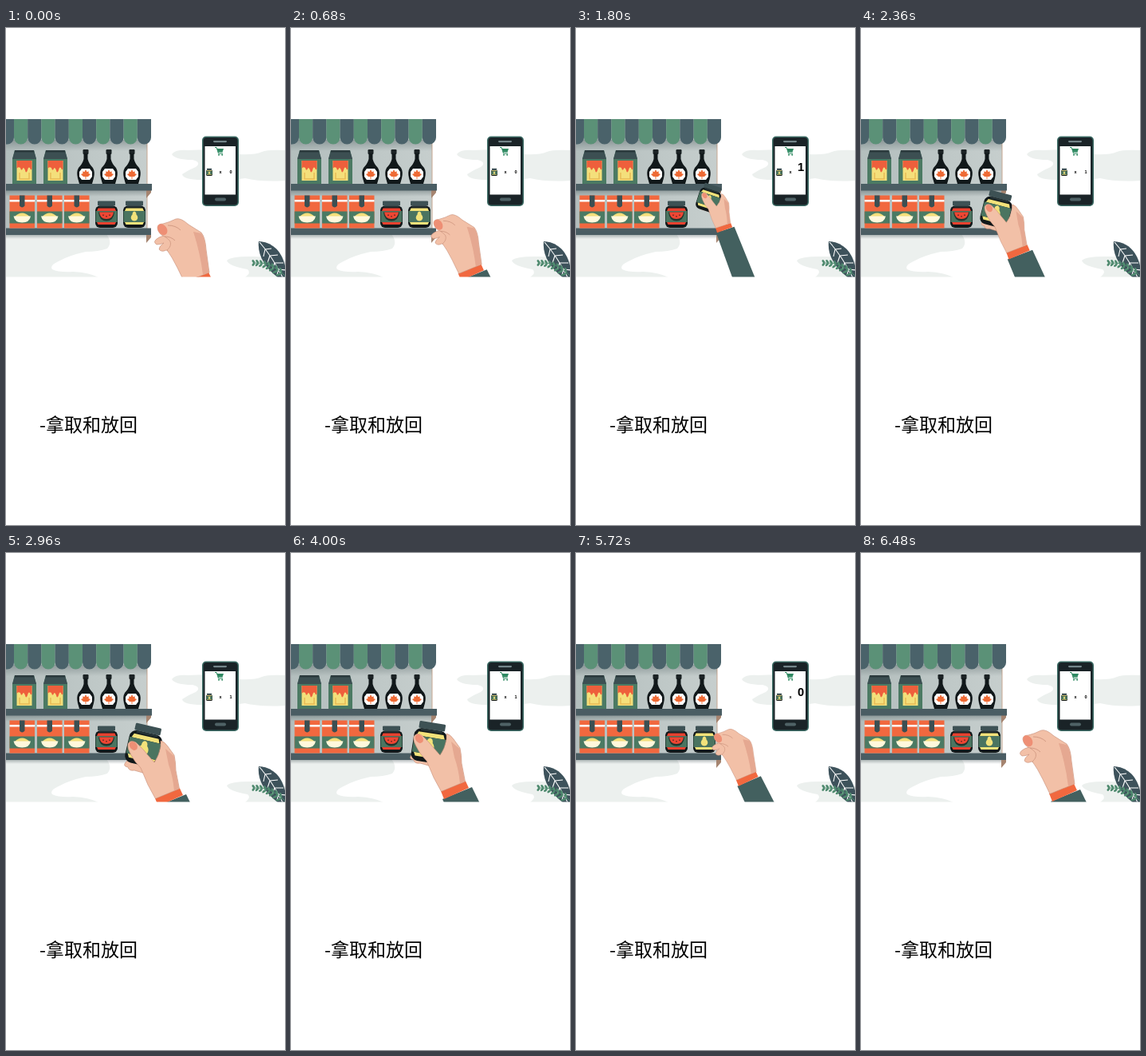
Animation of 350 by 622 pixels, one loop 6520 ms. Source, as an HTML page:

```html
<!DOCTYPE html>
<html lang="zh">
<head>
<meta charset="utf-8">
<title>拿取和放回</title>
<style>
html, body { margin: 0; width: 100%; height: 100%; overflow: hidden; background: #fff; }
svg { display: block; width: 100%; height: 100%; }
.title { font: 23px "Noto Sans CJK SC", "Noto Sans CJK", "Noto Sans CJK JP", sans-serif; }
.count { font: bold 5.5px "Liberation Sans", Arial, sans-serif; text-anchor: middle; }
.skin { fill: #f2c0a7; stroke: #c48a74; stroke-width: .6; stroke-linejoin: round; }
.shade { fill: #e5a891; }
.nail { fill: #ee8f75; }
</style>
</head>
<body>
<svg viewBox="0 0 350 622">
  <defs>
    <clipPath id="stage"><rect y="114" width="350" height="197.5"/></clipPath>
    <linearGradient id="wall" x2="1" y2="0">
      <stop offset="0" stop-color="#b3bebd"/><stop offset="1" stop-color="#c6cecd"/>
    </linearGradient>
    <linearGradient id="shadow" x2="0" y2="1">
      <stop offset="0" stop-color="#3a4a4d" stop-opacity=".35"/><stop offset="1" stop-color="#3a4a4d" stop-opacity="0"/>
    </linearGradient>

    <g id="carton">
      <path d="M3 0H27L30 11V42H0V11Z" fill="#4b7a63"/>
      <path d="M3 0H27L30 11H0Z" fill="#3c4f52"/>
      <path d="M3 0H27V2.5H3Z" fill="#2b3a3d"/>
      <rect x="5.5" y="13" width="19" height="25" fill="#f4df7b"/>
      <path d="M5.5 13H24.5V23Q23 26 22 22Q20 20 19 25Q17 30 16 25Q14 20 13 23Q11 27 10 22Q7 20 5.5 23Z" fill="#ee5f3c"/>
      <path d="M9 28V36H21V28" fill="none" stroke="#e9bb55" stroke-width="1.5"/>
    </g>
    <g id="bottle">
      <rect x="8.5" width="7" height="6" rx="1.2" fill="#1b2224"/>
      <path d="M9.500 5H14.500V12Q16 18 21 23Q24 28 22 36L20 43H4L2 36Q0 28 3 23Q8 18 9.500 12Z" fill="#11181a"/>
      <path d="M7 24H17L20 28V34L17 38H7L4 34V28Z" fill="#fff"/>
      <path d="M12 25L13.500 28L16 27.500L15.500 30L18 31L15 34H12.500V37H11.500V34H9L6 31L8.500 30L8 27.500L10.500 28Z" fill="#ee6a35"/>
    </g>
    <g id="box">
      <rect width="31.500" height="41" fill="#f1683f"/>
      <rect y="5.500" width="31.500" height="2.500" fill="#fff"/>
      <path d="M12.500 0H19V13Q15.700 17 12.500 13Z" fill="#3c4f52"/>
      <rect y="20" width="31.500" height="15" fill="#4b7a63"/>
      <path d="M6 27Q15.700 17 25.500 27Z" fill="#f4df7b"/>
      <path d="M5 26H26.500Q25 34 15.700 34T5 26Z" fill="#fff8dc"/>
    </g>
    <g id="jar">
      <rect x="-14" y="-11" width="28" height="27.500" rx="6" fill="#11181a"/>
      <rect x="-11" y="-17" width="22" height="6" rx="1" fill="#3d5154"/>
      <rect x="-9" y="-11" width="18" height="2" fill="#243235"/>
      <path d="M-10.500 -8H10.500L12 -4.500H-12ZM-12 9.500H12L10.500 12.500H-10.500Z" fill="currentColor"/>
      <rect x="-13.500" y="-4.500" width="27" height="14" fill="#4a7460"/>
    </g>
    <g id="pearJar" color="#f2e27a">
      <use href="#jar"/>
      <path d="M0 -4Q2.500 -3.500 2.500 0Q5 2.500 4 5.500Q2.500 8 0 8T-4 5.500Q-5 2.500 -2.500 0Q-2.500 -3.500 0 -4Z" fill="#f2e27a"/>
    </g>
    <g id="melonJar" color="#e8412f">
      <use href="#jar"/>
      <path d="M-10 -3H10Q9 8 0 8T-10 -3Z" fill="#20342c"/>
      <path d="M-9 -3H9Q8 5.500 0 5.500T-9 -3Z" fill="#ee4633"/>
      <path d="M-4 0v1.500M0 1.500v1.500M4 0v1.500" stroke="#11181a"/>
    </g>
    <g id="arm">
      <path d="M30 75L67 60L148 225L103 240Z" fill="#43605f"/>
      <path d="M28 65L59 52.500L63 61L32 75Z" fill="#f1683f"/>
    </g>
  </defs>

  <g clip-path="url(#stage)">
    <g fill="#ecf0ee">
      <path d="M0 258H126Q134 268 127 276Q116 280 100 280Q78 285 68 291Q54 297 58 302Q66 306 84 305Q104 306 116 312H0Z"/>
      <path d="M208 158Q212 152 228 153Q280 150 292 158Q312 159 321 155Q328 152 350 153V191Q320 193 300 188Q270 193 246 190Q222 190 221 183Q228 178 238 174Q246 168 234 165Q212 165 208 158Z"/>
      <path d="M277 291Q282 286 305 286Q330 285 350 292V312H300Q308 306 303 302Q279 298 277 291Z"/>
    </g>
    <g id="shelf"></g>
    <g id="plant"></g>

    <rect x="246" y="135.500" width="46" height="87.500" rx="5" fill="#3b6b64"/>
    <rect x="247.500" y="137" width="43" height="84.500" rx="4" fill="#1a2327"/>
    <rect x="249.500" y="148" width="38.500" height="60.500" fill="#fff"/>
    <rect x="260" y="141" width="17" height="2.200" rx="1.100" fill="#74868a"/>
    <rect x="262" y="212.500" width="14" height="4" rx="2" fill="#4f6266"/>
    <g fill="#2f8a62">
      <path d="M264.500 151H273L271.500 155.500H266Z"/>
      <path d="M262 149.500H264.200L266.500 157H272" fill="none" stroke="#2f8a62"/>
      <circle cx="267" cy="158.700" r="1"/><circle cx="271.200" cy="158.700" r="1"/>
    </g>
    <use href="#pearJar" transform="translate(255 180.500) scale(.28)"/>
    <text class="count" x="269" y="182">x</text>
    <text class="count" id="count">0</text>

    <g id="back"><path class="skin" d="M8 20Q-4 13 -9 20Q-13 25 -6 26Q-5 31 2 30L16 34Z"/></g>
    <use id="held" href="#pearJar"/>
    <g id="front">
      <use href="#arm"/>
      <g id="grip">
        <path class="skin" d="M-6 -3Q-3 -9 4 -5Q14 4 19 11L27 20Q33 12 35 0L35 -7Q40 -6 44 0L52 11Q54 20 54 30L58.500 53L28.500 65.500L19 48Q14 36 10 27Q1 18 -3 9Q-7 2 -6 -3Z"/>
        <path class="shade" d="M41 3L51.500 12Q54 24 53.500 30L58 53L52 55.500Q50 36 45 23Z"/>
        <ellipse class="nail" cx="1" cy="0" rx="4.500" ry="6" transform="rotate(-38)"/>
      </g>
      <g id="pinch">
        <path class="skin" d="M14 6Q0 6 -6 11Q-11 15 -6 18Q-1 18 3 16Q-3 20 -3 24Q0 28 6 25L20 31Z"/>
        <path class="skin" d="M-5 -3Q-5 -8 2 -8Q10 -10 18 -14Q24 -16 34 -7L50 3Q55 9 56 24L60 53L29 65.500L20 47Q13 33 7 25Q13 20 11 14Q8 10 4 8Q-4 5 -5 -3Z"/>
        <path class="shade" d="M40 2L50 4Q54.500 10 55.500 24L59.500 53L52 56Q49 30 40 2Z"/>
        <path d="M8 -6Q18 -6 24 0M4 8Q12 8 17 13" fill="none" stroke="#c48a74" stroke-width=".7"/>
        <ellipse class="nail" cx="1.500" cy="0" rx="5.500" ry="7.500" transform="rotate(-32)"/>
      </g>
    </g>
  </g>
  <text class="title" x="42" y="504.500">-拿取和放回</text>
</svg>
<script>
const LOOP = 6520, STEP = 40;
const $ = id => document.getElementById(id);
const put = (id, x, y) => `<use href="#${id}" x="${x}" y="${y}"/>`;
const box = (x, y, w, h, fill) => `<rect x="${x}" y="${y}" width="${w}" height="${h}" fill="${fill}"/>`;

function drawShelf() {
  let s = box(0, 114, 177, 137, 'url(#wall)') + box(176.5, 140, 1, 111, '#c7a892');
  s += box(0, 140, 177, 14, 'url(#shadow)') + box(0, 203, 177, 8, 'url(#shadow)') + box(0, 259, 176, 5, 'url(#shadow)');
  s += '<path d="M176 203h6v3l-6 7zM176 258h6v4l-6 7z" fill="#a58470"/>';
  for (let i = -1; i < 10; i++) {
    const x = 10 + i * 17.2;
    s += `<path d="M${x} 114h17.200v23a8.600 8.600 0 0 1 -17.200 0z" fill="${i % 2 ? '#4a626a' : '#5b9177'}"/>`;
  }
  s += box(0, 195, 183, 8.5, '#4a5d63') + box(0, 250.5, 182, 8.5, '#4a5d63');
  s += put('carton', 8, 153) + put('carton', 47, 153);
  for (const x of [88, 117, 146]) s += put('bottle', x, 152);
  for (const x of [4.5, 39, 73]) s += put('box', x, 209.5);
  $('shelf').innerHTML = s + put('melonJar', 126, 233.5);
}

function drawPlant() {
  let s = '<path d="M317 267C336 268 351 282 352 313H342C326 301 315 285 317 267Z" fill="#3d525b"/>';
  s += '<path d="M318 268Q334 286 347 312M325 277L323 286M325 277L333 276M331 285L328 294M331 285L341 284M337 294L334 302M337 294L348 294M342 302L340 309M342 302L351 303" fill="none" stroke="#fff" stroke-width="1.100"/>';
  s += '<path d="M311 294Q332 292 350 310" fill="none" stroke="#4f8a6f"/>';
  for (let i = 0; i < 8; i++) {
    const x = 312 + i * 4.8, y = 294 + i * i * .27, r = 2.4 + i * .2;
    for (const side of [-1, 1])
      s += `<ellipse cx="${-r}" rx="${r}" ry="1.400" fill="#4f8a6f" transform="translate(${x} ${y}) rotate(${side * 48 + i * 4})"/>`;
  }
  $('plant').innerHTML = s;
}

// Rows: time, x, y, scale, angle
const hand = [
  [0, 195, 253, 1, 0], [600, 186, 248, .94, 0], [1120, 162, 237, .77, -2],
  [1360, 153, 229, .645, -2], [1520, 153, 229, .645, -2], [1800, 161, 210, .6, 4],
  [2080, 161, 214, .68, 3], [2700, 159, 240, .99, 0], [2960, 159, 242, 1, 0],
  [4000, 160, 233, 1, 0], [4160, 160, 233, 1, 0], [4760, 154, 226, .65, 2],
  [4920, 154, 228, .62, 1], [5160, 153, 229, .635, -2], [5400, 153, 229, .635, -2],
  [6080, 207, 236, 1, 0], [6480, 208, 236, 1, 0]
];
const jar = [
  [0, 161, 233.5, 1, 0], [1520, 161, 233.5, 1, 0], [1800, 167, 213, 1, 18],
  [2080, 168, 217, 1.1, 16], [2700, 173, 239, 1.48, 13], [2960, 173.5, 241, 1.5, 13],
  [4000, 174, 237.5, 1.5, 9], [4160, 174, 237.5, 1.5, 9], [4760, 161, 229.5, 1.05, 8],
  [4920, 160.5, 231.5, 1, 7], [5160, 161, 233.5, 1, 0], [6520, 161, 233.5, 1, 0]
];
// Rows: time, size
const pulse = [[0, 1], [1560, 1], [1800, 2.7], [2240, 1], [5440, 1], [5680, 2.7], [6120, 1], [6520, 1]];

// Monotone cubic through the rows: smooth, with no overshoot around holds
function at(rows, t) {
  let i = 0;
  while (i < rows.length - 2 && t >= rows[i + 1][0]) i++;
  const a = rows[i], b = rows[i + 1], h = b[0] - a[0], u = Math.min(1, (t - a[0]) / h);
  const slope = (k, c) => rows[k] && rows[k + 1] ? (rows[k + 1][c] - rows[k][c]) / (rows[k + 1][0] - rows[k][0]) : 0;
  const tangent = (k, c) => {
    const p = slope(k - 1, c), q = slope(k, c);
    return p * q > 0 ? 2 * p * q / (p + q) : 0;
  };
  return a.slice(1).map((v, n) => {
    const c = n + 1, w = u * u * (3 - 2 * u);
    return v + (b[c] - v) * w + h * u * (1 - u) * ((1 - u) * tangent(i, c) - u * tangent(i + 1, c));
  });
}

const place = ([x, y, s, r]) => `translate(${x} ${y}) rotate(${r}) scale(${s})`;
const show = (id, on) => $(id).setAttribute('visibility', on ? 'visible' : 'hidden');

function draw(t) {
  const pose = place(at(hand, t)), pinching = t < 760 || t >= 5640;
  $('back').setAttribute('transform', pose);
  $('front').setAttribute('transform', pose);
  $('held').setAttribute('transform', place(at(jar, t)));
  show('back', !pinching);
  show('grip', !pinching);
  show('pinch', pinching);
  const [k] = at(pulse, t);
  $('count').textContent = t >= 1560 && t < 5440 ? 1 : 0;
  $('count').setAttribute('transform', place([282, 182 - (k - 1) * 1.6, k, 0]));
}

drawShelf();
drawPlant();
const start = performance.now();
function tick() {
  const t = (performance.now() - start) % LOOP;
  draw(Math.floor(t / STEP) * STEP);
  requestAnimationFrame(tick);
}
tick();
</script>
</body>
</html>
```
